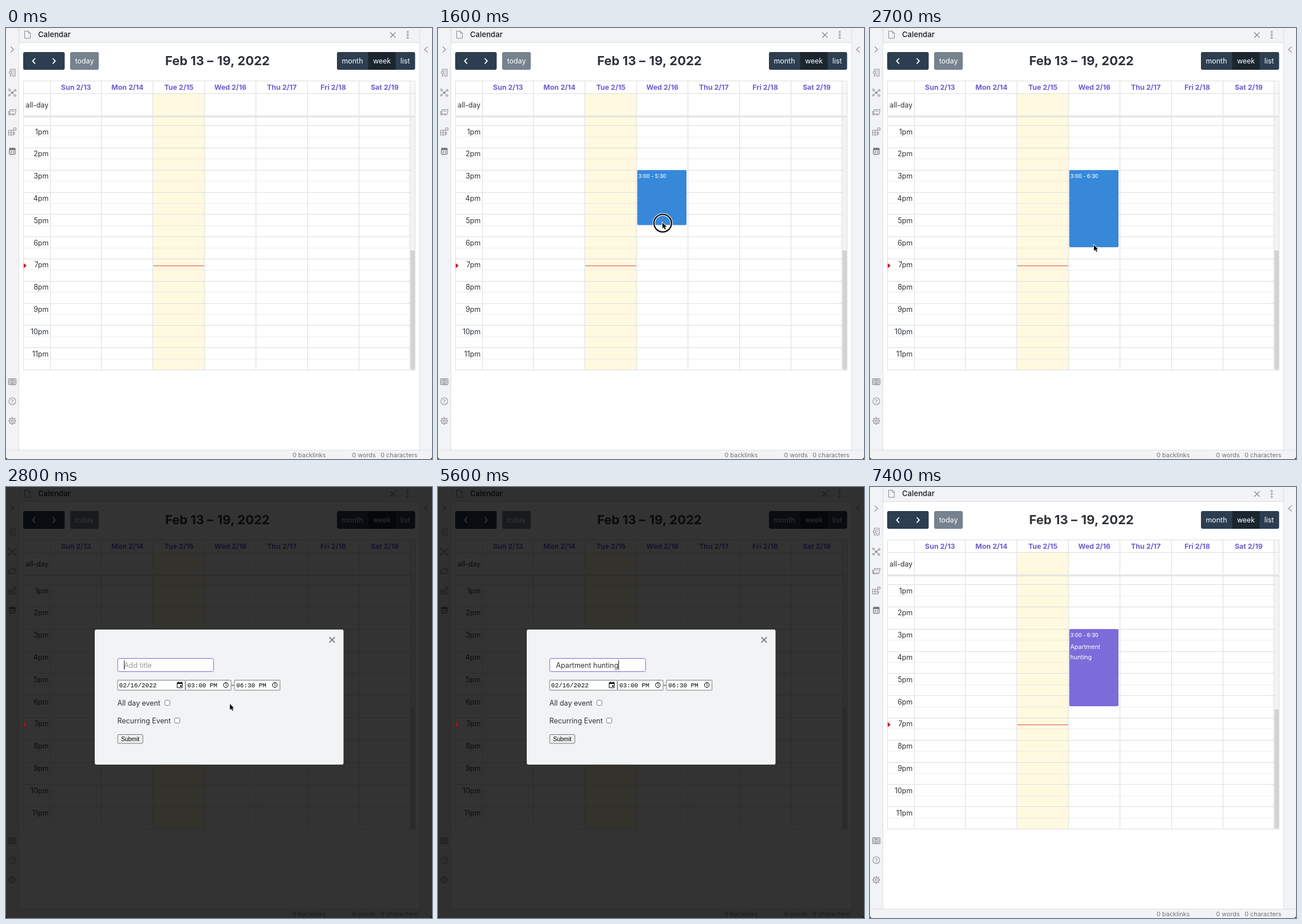
An HTML page with a canvas for the animation above (8.43 s loop, 744 by 753 pixels).

```html
<!DOCTYPE html>
<html lang="en">
<head>
<meta charset="utf-8">
<title>Calendar</title>
<style>
html, body { margin: 0; width: 100%; height: 100%; overflow: hidden; background: #fff; }
canvas { display: block; width: 744px; height: 753px; }
</style>
</head>
<body>
<canvas id="stage" width="744" height="753"></canvas>
<script>
const W = 744, H = 753, LOOP = 8430, STEP = 100;
const ctx = document.getElementById('stage').getContext('2d');
const SANS = 'Inter, sans-serif', MONO = '"Liberation Mono", monospace';
const INK = '#2e3338', LINE = '#dddddd', PANEL = '#f2f3f5', ICON = '#909296';
const ACCENT = '#705dcf', NAVY = '#2c3e50', FIELD = '#767676';
const SLOT = 19.4, TOP = 170.7, EVENT_TOP = 248.3;

const hourY = k => Math.floor(TOP + 2 * SLOT * k);
const colX = k => Math.floor(77 + 89.85 * k);

function rect(x, y, w, h, fill) {
  ctx.fillStyle = fill;
  ctx.fillRect(x, y, w, h);
}

function box(x, y, w, h, r, fill, stroke, lw = 1) {
  ctx.beginPath();
  ctx.roundRect(x, y, w, h, r);
  if (fill) { ctx.fillStyle = fill; ctx.fill(); }
  if (stroke) { ctx.strokeStyle = stroke; ctx.lineWidth = lw; ctx.stroke(); }
}

function text(s, x, y, size, color = INK, align = 'left', weight = 400, family = SANS) {
  ctx.font = `${weight} ${size}px ${family}`;
  ctx.textAlign = align;
  ctx.fillStyle = color;
  ctx.fillText(s, x, y);
}

function path(d, color, lw = 1, fill) {
  const p = new Path2D(d);
  if (fill) { ctx.fillStyle = fill; ctx.fill(p); }
  if (color) { ctx.strokeStyle = color; ctx.lineWidth = lw; ctx.stroke(p); }
}

function ring(x, y, r, color, lw = 1) {
  ctx.beginPath();
  ctx.arc(x, y, r, 0, Math.PI * 2);
  ctx.strokeStyle = color;
  ctx.lineWidth = lw;
  ctx.stroke();
}

function at(x, y, draw) {
  ctx.save();
  ctx.translate(x, y);
  draw();
  ctx.restore();
}

function sideIcons() {
  path('M8 32.5L13.5 37.5L8 42.5M736.5 32.5L731 37.5L736.5 42.5', ICON, 1.2);
  at(11, 78, () => {
    path('M-3.5 -3V-6H5V6H-3.5V3M-1 -3H3M1 0H3M-1 3.5H3', ICON, 1.1);
    ring(-3, 0, 2.2, ICON, 1.1);
  });
  at(11, 113, () => {
    path('M-4.5 -4L0 0L4.5 -4M-5 4L0 0L4 4.5', ICON, 1);
    for (const [x, y] of [[-5, -5], [5, -4], [0, 0], [-5, 4.5], [4.5, 5]]) ring(x, y, 1.5, ICON, 1.2);
  });
  at(11, 147, () => {
    path('M-3.5 -4.5H6.5L5 3H-5ZM-5 -1.5H-6.5L-6 4.8H4.5M-2.5 -2H4', ICON, 1.1);
  });
  at(11, 181, () => {
    path('M-6.5 -2.5H2V6H-6.5ZM-6.5 1.8H2M-2.2 -2.5V6M2.5 -6.5H6.5V-2.5H2.5ZM4 .5V4.5H2', ICON, 1.1);
  });
  at(11, 215, () => {
    box(-5, -5, 10, 10.5, 1, null, '#77797d', 1.3);
    rect(-5, -5, 10, 3.5, '#77797d');
    rect(-3, .5, 2.2, 2.2, '#77797d');
    rect(.8, .5, 2.2, 2.2, '#77797d');
  });
  at(11, 618, () => {
    box(-6.5, -5, 13, 10, 1, null, ICON, 1.3);
    box(-4.5, -3, 9, 6, 1, null, ICON);
    ring(0, 0, 2, ICON, 1.3);
  });
  ring(11, 652, 6, ICON, 1.1);
  text('?', 11, 655.6, 9.5, ICON, 'center', 500);
  at(11, 686.5, () => {
    ring(0, 0, 1.9, ICON, 1.1);
    ring(0, 0, 4.6, ICON, 1.1);
    for (let i = 0; i < 8; i++) {
      ctx.rotate(Math.PI / 4);
      path('M0 -4.6V-6.6', ICON, 2);
    }
  });
}

function frameUI() {
  rect(0, 0, W, H, PANEL);
  rect(23, 26, 699, 711, '#ffffff');
  rect(22, 0, 1, 737, LINE);
  rect(722, 0, 1, 737, LINE);
  rect(22, 25, 700, 1, LINE);
  rect(0, 737, W, 1, LINE);
  path('M32.5 5.5H39L42.5 9V18H32.5ZM39 5.5V9H42.5', '#85878b');
  text('Calendar', 56, 16.3, 13, INK, 'left', 600);
  path('M671 7.5L680.5 17M680.5 7.5L671 17', '#808286', 1.1);
  for (const y of [7, 12, 17]) ring(701.5, y, 1.4, '#808286', 1);
  sideIcons();
  text('0 backlinks', 500.5, 750, 10.8, '#6f7276');
  text('0 words', 604.5, 750, 10.8, '#6f7276');
  text('0 characters', 718.5, 750, 10.8, '#6f7276', 'right');
}

function toolbar() {
  box(30, 42, 72.5, 31, 3, NAVY);
  path('M51 53L46.5 57.7L51 62.4M81.5 53L86 57.7L81.5 62.4', '#ffffff', 1.8);
  box(112, 42, 50, 31, 3, '#76828d');
  text('today', 137, 62, 12.4, '#ffffff', 'center');
  text('Feb 13', 278, 65.4, 21.9, INK, 'left', 700);
  text('–', 356.8, 65.4, 21.9, INK, 'center', 700);
  text('19, 2022', 460.5, 65.4, 21.9, INK, 'right', 700);
  box(578, 42, 136.5, 31, 3, NAVY);
  rect(632.5, 42, 48, 31, '#1a252f');
  text('month', 605, 62, 12.4, '#ffffff', 'center');
  text('week', 656.5, 62, 12.4, '#ffffff', 'center');
  text('list', 697, 62, 12.4, '#ffffff', 'center');
}

function grid() {
  rect(colX(2), 114, 90, 483, '#fff9df');
  rect(706, 92, 8, 61, '#f8f8f8');
  rect(706, 156, 8, 441, '#f3f3f3');
  ctx.fillStyle = LINE;
  for (let k = 0; k < 8; k++) ctx.fillRect(colX(k), 92, 1, 505);
  for (const y of [92, 114, 597]) ctx.fillRect(30, y, 685, 1);
  for (const x of [30, 714]) ctx.fillRect(x, 92, 1, 506);
  for (let k = 0; k < 11; k++) {
    const y = hourY(k);
    rect(30, y, 677, 1, LINE);
    ctx.setLineDash([1, 1]);
    path(`M31 ${Math.floor(TOP + SLOT * (2 * k + 1)) + .5}H706`, LINE);
    ctx.setLineDash([]);
    text(k + 1 + 'pm', 74.3, TOP + 2 * SLOT * k + 14.8, 12.4, INK, 'right');
  }
  rect(30, 153, 685, 3, '#efefef');
  rect(30, 153, 685, 1, LINE);
  rect(30, 155, 685, 1, LINE);
  text('all-day', 74.3, 138.8, 12.4, INK, 'right');
  ['Sun', 'Mon', 'Tue', 'Wed', 'Thu', 'Fri', 'Sat'].forEach((day, i) =>
    text(`${day} 2/${13 + i}`, 122.3 + 89.85 * i, 107.8, 12.4, ACCENT, 'center', 700));
  box(706.5, 388, 7.5, 209, 3.7, '#d3d3d3');
  rect(257, 415, 89, 1, '#e04848');
  nowArrow('#dd1111');
}

function nowArrow(color) {
  path('M31 411L36 415.3L31 419.5Z', null, 0, color);
}

function eventCard(slots, color, title) {
  const half = 6 + slots;
  box(348, EVENT_TOP, 86, slots * SLOT - 1, 2, color);
  text(`3:00 - ${half >> 1}:${half % 2 ? 30 : '00'}`, 349.8, 262, 9, '#ffffff', 'left', 500);
  title.forEach((s, i) => text(s, 349.8, 282.5 + 18.6 * i, 10.54, '#ffffff'));
}

function clock(x) {
  ring(x, 346, 4.1, '#111', 1.1);
  path(`M${x} 343.4V346.2L${x + 1.8} 347.4`, '#111', 1);
}

function modal(typed, caret) {
  rect(0, 0, W, H, 'rgba(0,0,0,.8)');
  nowArrow('#a81028');
  box(155, 249, 434.5, 236, 3, PANEL);
  path('M564.8 262.3L574.2 271.7M574.2 262.3L564.8 271.7', '#86888b', 2.2);

  box(195, 299.5, 167.5, 23, 3, '#ffffff', '#7b6cd9');
  text(typed || 'Add title', 206, 315.5, 12.4, typed ? INK : '#96989b');
  if (caret) {
    const x = 206 + (typed ? ctx.measureText(typed).width : 0);
    rect(Math.round(x), 303, 1, 16, '#111111');
  }

  for (const [x, w] of [[195, 118], [313.5, 79.5], [399, 79.5]]) box(x, 337.5, w, 17.5, 1, '#ffffff', FIELD);
  text('02/16/2022', 197.6, 349.5, 10.9, '#000', 'left', 400, MONO);
  text('03:00 PM', 316.8, 349.5, 10.9, '#000', 'left', 400, MONO);
  text('06:30 PM', 402.3, 349.5, 10.9, '#000', 'left', 400, MONO);
  text('-', 396, 350, 12.4, INK, 'center');
  box(299, 342, 9, 8.7, .5, null, '#111', 1.1);
  rect(299, 341.5, 9, 2.6, '#111');
  rect(300.3, 340, 1.3, 2, '#111');
  rect(305.4, 340, 1.3, 2, '#111');
  rect(304, 346.4, 2.6, 2.6, '#111');
  clock(384);
  clock(469.5);

  text('All day event', 194.5, 381.5, 12.4);
  box(277.5, 372.5, 9, 9, 2, '#ffffff', FIELD);
  text('Recurring Event', 194.5, 412.5, 12.4);
  box(294.5, 403.5, 9, 9, 2, '#ffffff', FIELD);
  box(195, 432.5, 44, 15.5, 2, '#efefef', FIELD);
  text('Submit', 217, 444, 10.35, '#000', 'center', 400, '"Liberation Sans", sans-serif');
}

// Pointer keys: time, x, y
const DRAG = [
  [100, 690, 330], [200, 560, 300], [300, 440, 272], [400, 407, 264], [600, 407, 263], [800, 408, 257],
  [1200, 408, 257], [1400, 402, 275], [1600, 392, 340], [1700, 392, 374], [1800, 392, 396],
  [2000, 392, 394], [2200, 391, 385], [2400, 391, 379], [3800, 391, 379]
];
const LEAVE = [[6700, 413, 375], [7000, 413, 375], [7100, 440, 371], [7200, 570, 376], [7300, 709, 380], [7400, 719, 380]];

function along(keys, t) {
  if (t < keys[0][0] || t >= keys[keys.length - 1][0]) return null;
  const i = keys.findIndex(k => k[0] > t);
  const [a, b] = [keys[i - 1], keys[i]];
  const f = (t - a[0]) / (b[0] - a[0]);
  return { x: a[1] + (b[1] - a[1]) * f, y: a[2] + (b[2] - a[2]) * f };
}

function pointer({ x, y }, pressed) {
  if (pressed) {
    ring(x + .5, y + 1, 15.3, '#ffffff', 4.5);
    ring(x + .5, y + 1, 15.3, '#0a0a0a', 2.3);
  }
  at(x, y, () => path('M0 0V10.2L2.3 8.1L4 12L5.7 11.2L4.1 7.5H7.3Z', '#ffffff', 1.6, '#000'));
  at(x, y, () => path('M0 0V10.2L2.3 8.1L4 12L5.7 11.2L4.1 7.5H7.3Z', null, 0, '#000'));
}

const TITLE = 'Apartment hunting';
// Times of key strokes; the space and one late letter share a step
const KEYS = [3800, 3900, 4000, 4100, 4300, 4400, 4600, 4700, 4800, 4800, 5000, 5100, 5300, 5400, 5500, 5500, 5600];

function render(t) {
  const hand = along(DRAG, t) || along(LEAVE, t);
  frameUI();
  toolbar();
  grid();
  if (t >= 1200 && t < 2800) {
    eventCard(Math.max(1, Math.ceil((hand.y - EVENT_TOP) / SLOT)), '#3788d8', []);
  }
  if (t >= 6100) eventCard(7, '#7b6cd9', TITLE.split(' '));
  if (t >= 2800 && t < 6100) {
    modal(TITLE.slice(0, KEYS.filter(k => k <= t).length), t < 3300 || t >= 3800);
  }
  if (hand) pointer(hand, t >= 1100 && t < 2700);
  path('M0 749Q0 753 4 753H0ZM744 749Q744 753 740 753H744Z', null, 0, '#000');
}

const start = performance.now();
function tick() {
  const t = (performance.now() - start) % LOOP;
  render(Math.floor(t / STEP) * STEP);
  requestAnimationFrame(tick);
}
tick();
</script>
</body>
</html>
```
